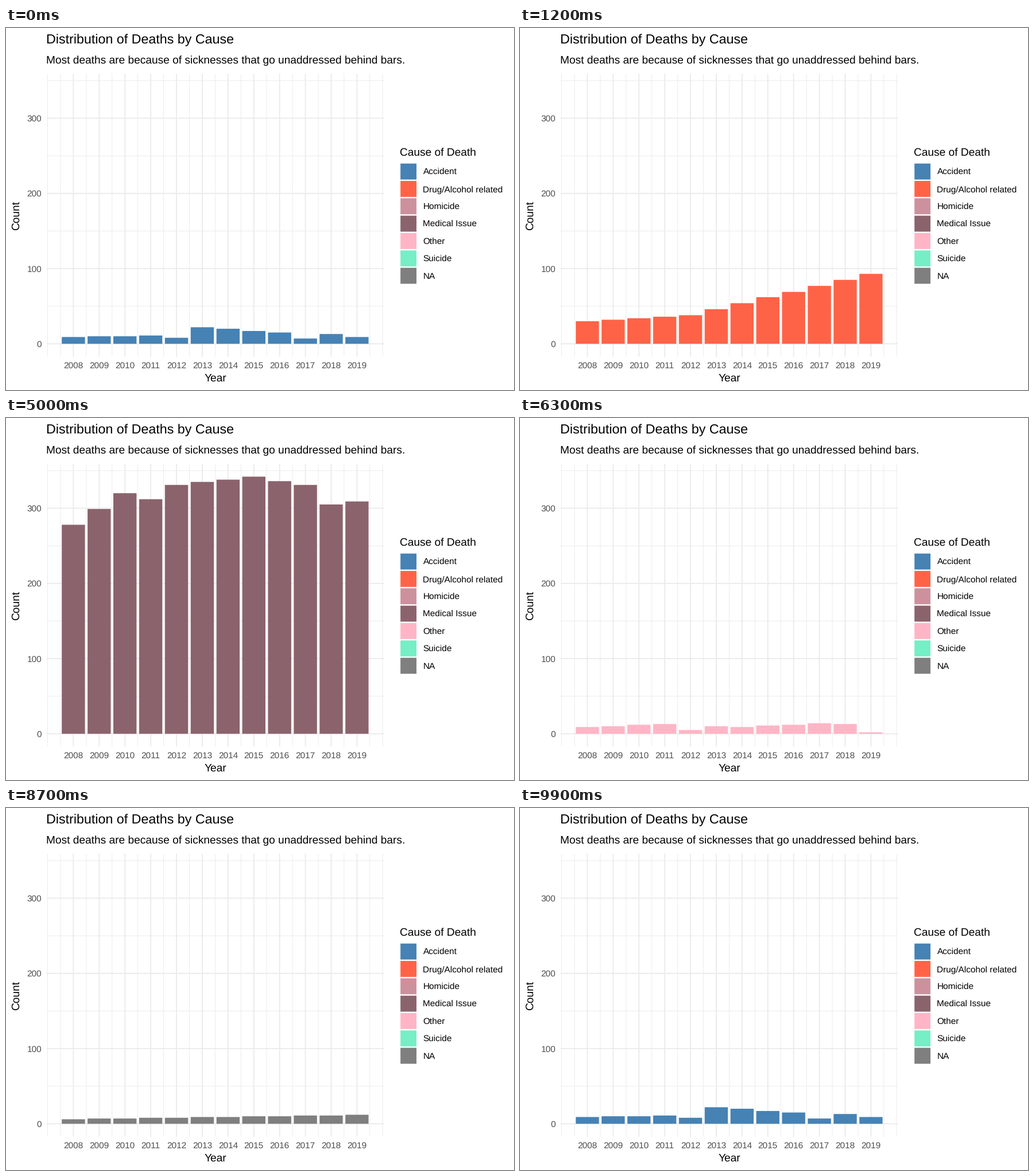
A matplotlib script that plays this animation: 885x632 px, repeating every 10 s.

```python
import numpy as np
import matplotlib.pyplot as plt
from matplotlib.animation import FuncAnimation
from matplotlib.patches import Rectangle

WIDTH, HEIGHT, DPI = 885, 632, 64
LEFT, RIGHT, TOP, BOTTOM = 70.6, 658.4, 80.0, 573.8
YEARS = np.arange(2008, 2020)
BASE, SMALL, LARGE = 19.1, 15.4, 23.3
INTERVAL, LOOP = 100, 10000

COLOURS = {
    "Accident": "#4682B4",
    "Drug/Alcohol related": "#FF6347",
    "Homicide": "#CD919E",
    "Medical Issue": "#8B636C",
    "Other": "#FFB5C5",
    "Suicide": "#76EEC6",
    "NA": "#7F7F7F",
}


def trend(**turns):
    """Yearly counts on straight runs between turning points (y08=..., y19=...)."""
    years = [2000 + int(name[1:]) for name in turns]
    return np.round(np.interp(YEARS, years, list(turns.values())))


ACCIDENTS = trend(y08=9, y11=11, y12=8, y13=22, y16=15, y17=7, y18=13, y19=9)

# (start in ms, cause, count per year)
STATES = [
    (0, "Accident", ACCIDENTS),
    (1200, "Drug/Alcohol related", trend(y08=30, y12=38, y19=93)),
    (2500, "Homicide", trend(y08=12, y17=25, y19=20)),
    (3800, "NA", np.isin(YEARS, (2009, 2012)).astype(int)),
    (5000, "Medical Issue",
     trend(y08=278, y10=320, y11=312, y12=331, y15=342, y17=331, y18=305, y19=309)),
    (6300, "Other", trend(y08=9, y11=13, y12=5, y13=10, y14=9, y17=14, y18=13, y19=2)),
    (7500, "Suicide", trend(y08=98, y09=155, y12=164, y16=207, y17=190, y19=172)),
    (8700, "NA", trend(y08=6, y19=12)),
    (9900, "Accident", ACCIDENTS),
]

plt.rcParams["font.family"] = "Liberation Sans"
plt.rcParams["text.hinting"] = "none"
fig = plt.figure(figsize=(WIDTH / DPI, HEIGHT / DPI), dpi=DPI, facecolor="white")
ax = fig.add_axes([0, 0, 1, 1])
ax.set_xlim(0, WIDTH)
ax.set_ylim(HEIGHT, 0)
ax.axis("off")


def year_x(year):
    return 117.4 + (year - 2008) * 44.91


def count_y(count):
    return 551.3 - count * 1.3126


def points(pixels):
    return pixels * 72 / DPI


def label(x, y, text, size=BASE, color="black", va="baseline", **kwargs):
    ax.text(x, y, text, fontsize=points(size), color=color, va=va, **kwargs)


def grid_line(xs, ys, width):
    ax.plot(xs, ys, color="#EBEBEB", lw=points(width), solid_capstyle="butt",
            snap=False, zorder=1)


def block(x, y, w, h, color="white"):
    return ax.add_patch(Rectangle((x, y), w, h, facecolor=color, linewidth=0,
                                  snap=False, zorder=3))


def draw_grid():
    minor_years = [2007, *np.arange(2007.5, 2020), 2020]
    for counts, years, width in ((range(50, 400, 100), minor_years, 0.93),
                                 (range(0, 400, 100), YEARS, 1.85)):
        for count in counts:
            grid_line([LEFT, RIGHT], [count_y(count)] * 2, width)
        for year in years:
            grid_line([year_x(year)] * 2, [TOP, BOTTOM], width)


def draw_labels():
    for count in range(0, 400, 100):
        label(62, count_y(count) + 5.5, str(count), SMALL, "#4D4D4D", ha="right")
    for year in YEARS:
        label(year_x(year), 594, str(year), SMALL, "#4D4D4D", ha="center")
    label(70, 27, "Distribution of Deaths by Cause", LARGE)
    label(70, 62, "Most deaths are because of sicknesses that go "
                  "unaddressed behind bars.")
    label(364.5, 617, "Year", ha="center")
    label(17.5, 327, "Count", rotation=90, ha="center", va="center")


def draw_legend():
    label(686, 223, "Cause of Death")
    for i, (cause, color) in enumerate(COLOURS.items()):
        middle = 250.6 + 30.33 * i
        block(687.2, middle - 13.95, 27.9, 27.9, color)
        label(726.5, middle + 5.5, cause, SMALL)


draw_grid()
draw_labels()
draw_legend()
bars = [block(year_x(year - 0.45), count_y(0), 0.9 * 44.91, 0) for year in YEARS]


def update(frame):
    _, cause, counts = [s for s in STATES if s[0] <= frame * INTERVAL][-1]
    for bar, count in zip(bars, counts):
        bar.set_height(count_y(count) - count_y(0))
        bar.set_facecolor(COLOURS[cause])
        bar.set_visible(count > 0)
    return bars


anim = FuncAnimation(fig, update, frames=LOOP // INTERVAL, interval=INTERVAL,
                     init_func=lambda: update(0), repeat=True, repeat_delay=0)
plt.show()
```
